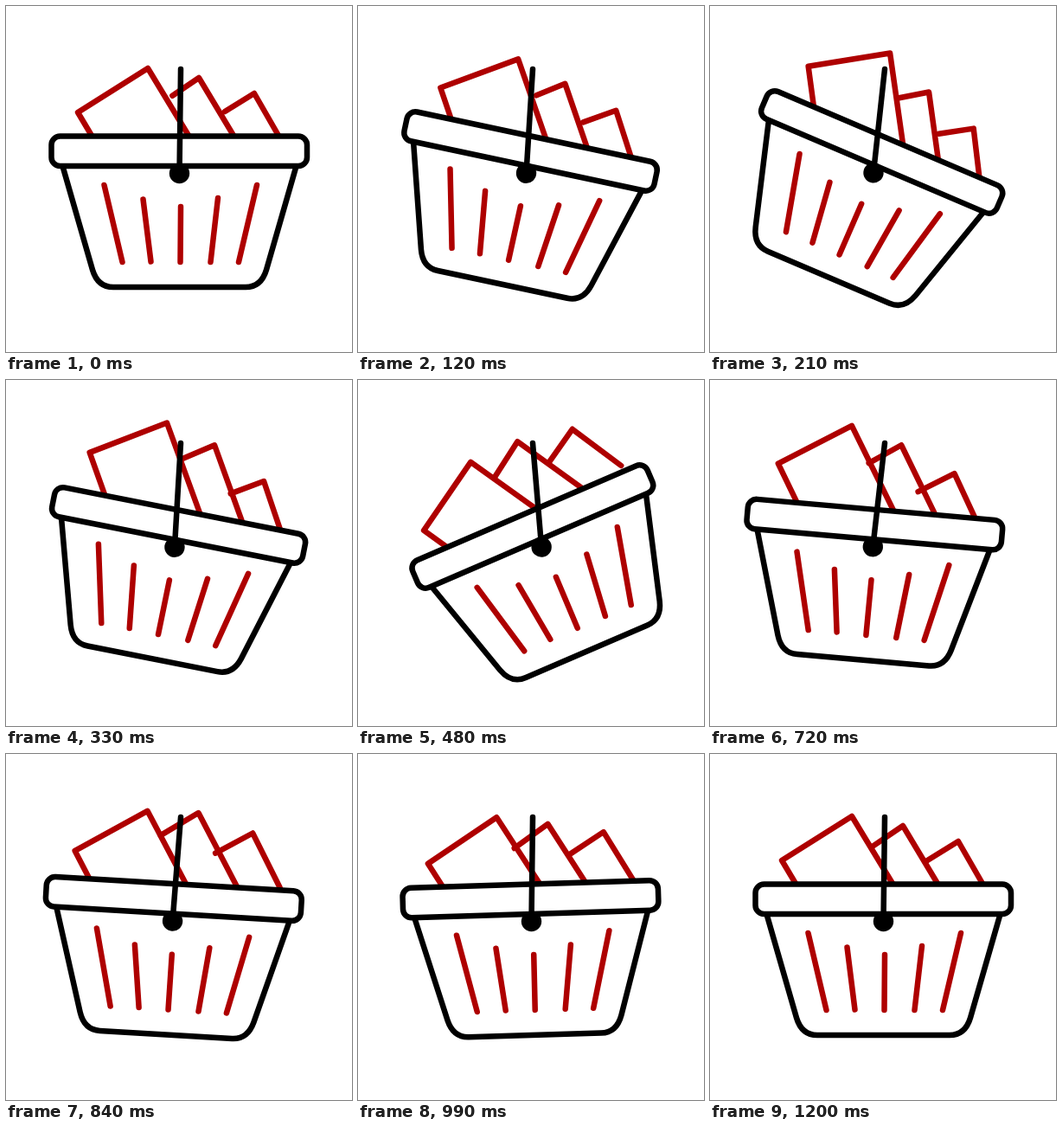
Animation, 400 px wide and 400 px high, one loop 3260 ms. Source, as an HTML page:

```html
<!DOCTYPE html>
<html lang="en">
<head>
<meta charset="utf-8">
<title>Swinging basket</title>
<style>
  html, body { margin: 0; width: 100%; height: 100%; overflow: hidden; background: #fff; }
  svg { display: block; width: 100%; height: 100%; }
  path, line, rect { fill: none; stroke: #000; stroke-width: 6.5; stroke-linecap: round; stroke-linejoin: round; }
  .red path { stroke: #ae0000; }
  .rim { fill: #fff; }
</style>
</head>
<body>
<svg viewBox="0 0 400 400">
  <g id="swing">
    <g id="basket">
      <g class="red">
        <path id="box0"/>
        <path id="box1"/>
        <path id="box2"/>
      </g>
      <path d="M66 187L100 305Q106 325 124 325H277Q295 325 301 305L335 187"/>
      <rect class="rim" x="52.5" y="150.5" width="295.5" height="34.5" rx="10"/>
      <g class="red">
        <path d="M113.5 207L134.5 296M158.5 223.5L167.5 295.5M202 232L201.5 296M245 222L236.5 296M290 207L269 296"/>
      </g>
    </g>
    <line x1="202" y1="73" x2="200.5" y2="193"/>
    <circle cx="200.5" cy="193.5" r="11.7"/>
  </g>
</svg>
<script>
const LOOP = 3260, STEP = 30, END = 1200;
const $ = id => document.getElementById(id);

// Tracks are lists of [time, value], eased with a half cosine.
const handle = [[0, 0], [240, 5.7], [500, -5.7], [740, 6], [980, 0]];
const tilt = [[0, 0], [240, 24], [500, -24], [740, 5.5], [1020, -2], [1200, 0]];

// apex, foot of the right edge, left direction, hop height and left edge length
const boxes = [
  { apex: [164, 72], foot: [210, 148], dir: [-0.846, 0.533], tail: [28, 47],
    hop: [[0, 0], [320, 18], [500, 0.5], [660, 18], [920, 0]],
    len: [[0, 95.7]] },
  { apex: [223, 83], foot: [262, 148], dir: [-0.828, 0.561],
    hop: [[190, 0], [400, 19], [600, 0], [820, 16.5], [1030, 0]],
    len: [[0, 37], [210, 35], [330, 41.5], [480, 47.5], [600, 35], [840, 51], [1200, 42.5]] },
  { apex: [287, 101], foot: [314, 148], dir: [-0.85, 0.525],
    hop: [[280, 0], [500, 19], [720, 0], [890, 18], [1080, 0]],
    len: [[0, 40], [330, 41], [480, 46], [600, 45], [840, 49], [1200, 43.4]] }
];

function at(track, t) {
  if (t <= track[0][0]) return track[0][1];
  for (let i = 1; i < track.length; i++) {
    const [t0, a] = track[i - 1], [t1, b] = track[i];
    if (t < t1) return a + (b - a) * (1 - Math.cos(Math.PI * (t - t0) / (t1 - t0))) / 2;
  }
  return track[track.length - 1][1];
}

function boxPath({ apex: [x, y], foot, dir, tail, len }, t) {
  const n = at(len, t);
  const left = [x + dir[0] * n, y + dir[1] * n];
  // the right edge runs on behind the rim
  const right = [x + (foot[0] - x) * 1.3, y + (foot[1] - y) * 1.3];
  const start = tail ? `M${left[0] + tail[0]} ${left[1] + tail[1]}L` : "M";
  return `${start}${left}L${x} ${y}L${right}`;
}

function draw(time) {
  const t = Math.min(END, Math.floor((time % LOOP) / STEP) * STEP);
  const swing = at(handle, t);
  $("swing").setAttribute("transform", `rotate(${swing} 202 73)`);
  $("basket").setAttribute("transform", `rotate(${at(tilt, t) - swing} 200.5 193)`);
  boxes.forEach((box, i) => {
    const el = $("box" + i);
    el.setAttribute("d", boxPath(box, t));
    el.setAttribute("transform", `translate(0 ${-at(box.hop, t)})`);
  });
}

let begin;
function tick() {
  const now = performance.now();
  begin ??= now;
  draw(now - begin);
  requestAnimationFrame(tick);
}
tick();
</script>
</body>
</html>
```
